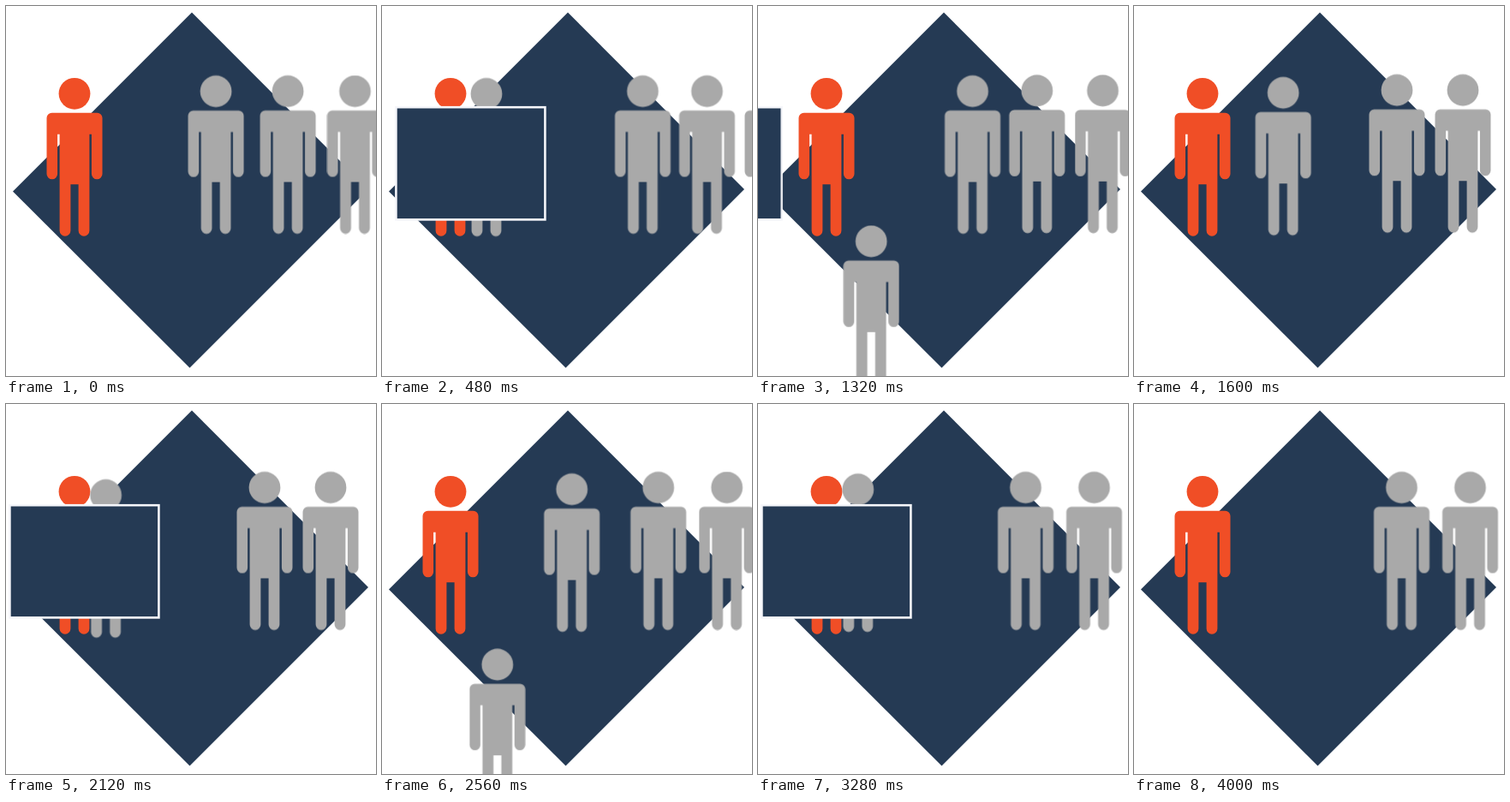
An HTML page that plays this animation: 432x432 px, repeating every 4200 ms.

```html
<!DOCTYPE html>
<html lang="en">
<head>
<meta charset="utf-8">
<title>Queue</title>
<style>
  html, body { margin: 0; width: 100%; height: 100%; overflow: hidden; background: #fff; }
  svg { display: block; width: 100%; height: 100%; }

  .navy { fill: #253a54; }
  .orange { fill: #f04e26; }
  .visitor { fill: #a9a9a9; }
  .visitor, .screen { animation: 4.2s linear infinite; }
  .screen { stroke: #f5f6fa; stroke-width: 2.6; animation-name: screen; }
  .first { animation-name: first; }
  .second { animation-name: second; }
  .third { animation-name: third; }
  .fourth { animation-name: fourth; }
  .fifth { animation-name: fifth; }

  /* Each visitor walks in, crouches, hops and drops out of the stage. */
  @keyframes first {
    0% { transform: translate(249.5px, 99.5px); }
    11.43% { transform: translate(122px, 102.5px); }
    13% { transform: translate(117px, 102.5px); }
    23.1% { transform: translate(116.5px, 107px); }
    26.4% { transform: translate(117px, 92.5px); animation-timing-function: cubic-bezier(.33, .25, .67, .62); }
    35.5%, 100% { transform: translate(147px, 451px); }
  }
  @keyframes second {
    0% { transform: translate(330px, 99.5px); }
    11.43% { transform: translate(304.5px, 99.5px); }
    22.86% { transform: translate(270.5px, 99.5px); }
    31.67% { transform: translate(250px, 99.5px); }
    38.1% { transform: translate(174.5px, 101.3px); }
    40% { transform: translate(147px, 102.3px); }
    42.4% { transform: translate(117px, 102.5px); }
    51.9% { transform: translate(116.5px, 107px); }
    55.24% { transform: translate(117px, 92.5px); animation-timing-function: cubic-bezier(.33, .25, .67, .62); }
    64.3%, 100% { transform: translate(147px, 451px); }
  }
  @keyframes third {
    0% { transform: translate(408.5px, 99.5px); }
    11.43% { transform: translate(379.5px, 99.5px); }
    22.86% { transform: translate(350px, 99.5px); }
    38.1% { transform: translate(307px, 98.2px); }
    40.2%, 54% { transform: translate(302px, 97.5px); }
    60.95% { transform: translate(222px, 99.5px); }
    66.4% { transform: translate(146px, 101.5px); }
    69% { transform: translate(117px, 102.5px); }
    76.4% { transform: translate(116.5px, 107px); }
    79.8% { transform: translate(117px, 92.5px); animation-timing-function: cubic-bezier(.33, .25, .67, .62); }
    88.8%, 100% { transform: translate(147px, 451px); }
  }
  @keyframes fourth {
    0% { transform: translate(485px, 99.5px); }
    11.43% { transform: translate(456px, 99.5px); }
    22.86% { transform: translate(426.5px, 99.5px); }
    38.1% { transform: translate(384px, 98.2px); }
    40.2%, 54% { transform: translate(379px, 97.5px); }
    60.95% { transform: translate(322.7px, 97.5px); }
    66.4%, 100% { transform: translate(312.5px, 97.5px); }
  }
  @keyframes fifth {
    0%, 54% { transform: translate(480px, 97.5px); }
    60.95% { transform: translate(402.7px, 97.5px); }
    66.4%, 100% { transform: translate(392.5px, 97.5px); }
  }
  @keyframes screen {
    0%, 5.7% { transform: translateX(-195px); }
    10.9%, 26.7% { transform: none; }
    32.4%, 41.9% { transform: translateX(-195px); }
    47.1%, 55.5% { transform: translateX(-12px); }
    60.7%, 68.3% { transform: translateX(-195px); }
    73.6%, 80% { transform: translateX(-12px); }
    85.7%, 100% { transform: translateX(-195px); }
  }
</style>
</head>
<body>
<svg viewBox="0 0 432 432">
  <defs>
    <g id="person">
      <circle r="18.4"/>
      <path d="M-32.5 28.5a6 6 0 0 1 6-6H26.5a6 6 0 0 1 6 6V93.7a6.3 6.3 0 0 1-12.6 0V47.5H17.4V160a6.4 6.4 0 0 1-12.8 0V106H-4.6V160a6.4 6.4 0 0 1-12.8 0V47.5H-19.9V93.7a6.3 6.3 0 0 1-12.6 0Z"/>
    </g>
  </defs>
  <path class="navy" d="M217 7.5L423 214L214.5 422.5L8 216.5Z"/>
  <use class="orange" href="#person" x="80" y="102.3"/>
  <use class="visitor fifth" href="#person"/>
  <use class="visitor fourth" href="#person"/>
  <use class="visitor third" href="#person"/>
  <use class="visitor second" href="#person"/>
  <use class="visitor first" href="#person"/>
  <rect class="navy screen" x="16.4" y="118.2" width="174" height="131.2"/>
</svg>
</body>
</html>
```
